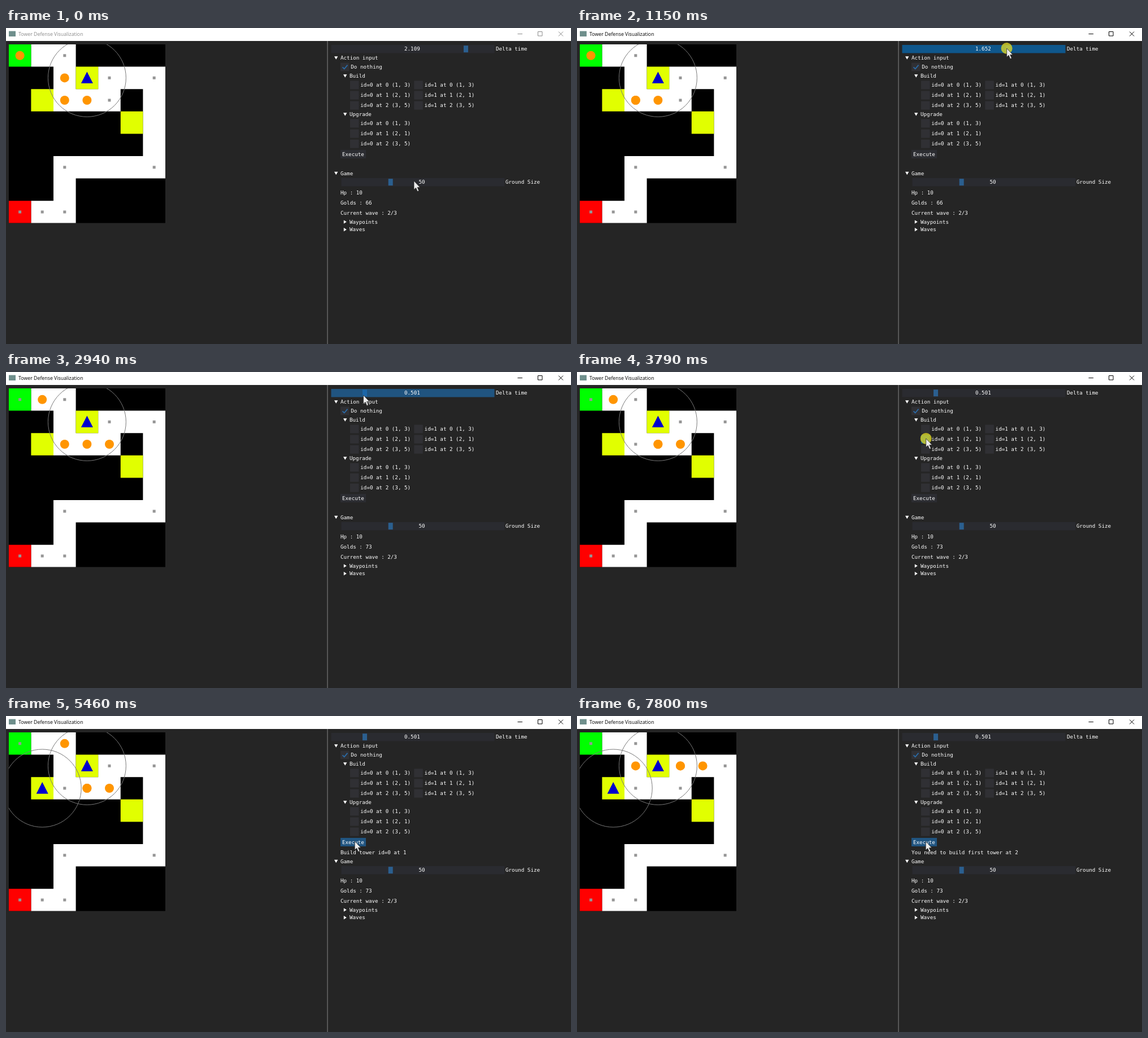
An HTML page for the animation above (8 s loop, 1000 by 560 pixels).

```html
<!DOCTYPE html>
<html lang="en">
<head>
<meta charset="utf-8">
<title>Tower Defense Visualization</title>
<style>
html, body { margin: 0; width: 100%; height: 100%; overflow: hidden; background: #252525; }
svg { display: block; width: 1000px; height: 560px; }
text { font: 9.22px "DejaVu Sans Mono", "Liberation Mono", monospace; fill: #fff; white-space: pre; }
#title { font: 8.8px "Open Sans", "Noto Sans", sans-serif; }
</style>
</head>
<body>
<svg id="stage" viewBox="0 0 1000 560"></svg>
<script>
const LOOP = 8000, CELL = 39.6, MAP_X = 4.8, MAP_Y = 29;
const stage = document.getElementById('stage');

function set(el, attrs) {
  for (const k in attrs) el.setAttribute(k, attrs[k]);
}
function add(tag, attrs, parent = stage) {
  const el = document.createElementNS('http://www.w3.org/2000/svg', tag);
  set(el, attrs);
  return parent.appendChild(el);
}
const rect = (x, y, width, height, fill, parent) => add('rect', { x, y, width, height, fill }, parent);
const show = (el, on) => set(el, { visibility: on ? 'visible' : 'hidden' });
function label(x, y, str = '') {
  const el = add('text', { x, y: y + 2.9 });
  el.textContent = str;
  return el;
}

// Window frame
rect(0, 0, 1000, 560, '#252525');
rect(0, 0, 1000, 23, '#fff');
rect(5, 5.5, 12, 9.5, '#6f8f8c');
const title = label(22, 11.1, 'Tower Defense Visualization');
title.id = 'title';
const buttons = add('path', {
  d: 'M905.5 10.5h8.5M941.5 6.5h7.5v7.5h-7.5zM978 6.5l8 8M986 6.5l-8 8', fill: 'none'
});
rect(568.3, 23, 1.4, 537, '#6b6b6b');

// Map: the road runs through the waypoints, as [column, row]
const waypoints = [[0, 0], [2, 0], [2, 2], [4, 2], [4, 1], [6, 1], [6, 5], [2, 5], [2, 7], [1, 7], [0, 7]];
const spots = [[3, 1], [1, 2], [5, 3]];
const road = [waypoints[0]];
for (const [c, r] of waypoints.slice(1)) {
  let [x, y] = road[road.length - 1];
  while (x !== c || y !== r) {
    x += Math.sign(c - x);
    y += Math.sign(r - y);
    road.push([x, y]);
  }
}
const left = c => MAP_X + c * CELL, top_ = r => MAP_Y + r * CELL;
const midX = c => left(c + .5), midY = r => top_(r + .5);

rect(MAP_X, MAP_Y, 7 * CELL, 8 * CELL, '#000', add('clipPath', { id: 'mapClip' }));
const map = add('g', { 'clip-path': 'url(#mapClip)' });
rect(MAP_X, MAP_Y, 7 * CELL, 8 * CELL, '#000', map);
function tiles(cells, fill) {
  const d = cells.map(([c, r]) => `M${left(c)} ${top_(r)}h${CELL}v${CELL}h${-CELL}z`).join('');
  add('path', { d, fill }, map);
}
tiles(road.slice(1, -1), '#fff');
tiles(road.slice(0, 1), '#0f0');
tiles(road.slice(-1), '#f00');
tiles(spots, '#e1ff00');
for (const [c, r] of waypoints) rect(midX(c) - 2.5, midY(r) - 2.5, 5, 5, '#969696', map);

// Each walker starts on a road cell and hops one cell on at each time
const walkers = [
  { cell: 0, hops: [2010, 4360, 5620] },
  { cell: 3, hops: [600, 3350, 5620, 6540] },
  { cell: 4, hops: [2840, 5620, 6540] },
  { cell: 5, hops: [2840, 5620, 7330] }
];
for (const w of walkers) w.el = add('circle', { r: 8, fill: '#ff9500' }, map);

function tower([c, r]) {
  const g = add('g', { transform: `translate(${midX(c)} ${midY(r)})` }, map);
  add('path', { d: 'M0 -11L10.5 9.7H-10.5z', fill: '#0000cd' }, g);
  add('circle', { r: 69, fill: 'none', stroke: '#787878' }, g);
  return g;
}
tower(spots[0]);
const newTower = tower(spots[1]);

// Control panel
const BAR = '#2a2b30', GRAB = '#2b5f8f', HOVER = '#205480', ACTIVE = '#0f578c';
const widgets = {};
function widget(key, x, y, w, h, idle) {
  widgets[key] = { x, y, w, h, idle, el: rect(x, y, w, h, idle) };
}
function checkbox(key, x, y, str) {
  widget(key, x, y - 7.5, 15.5, 15, '#303034');
  widgets[key].tick = add('path', {
    d: `M${x + 3.5} ${y + .3}l3.2 3.2l5.8 -6.8`, fill: 'none', stroke: '#2a6ba8', 'stroke-width': 1.8
  });
  label(x + 18.3, y, str);
}
function node(x, y, str, open = true) {
  const d = open ? `M${x - 3} ${y - 2.8}h6.4l-3.2 5.5z` : `M${x - 2.2} ${y - 3.4}v6.4l5 -3.2z`;
  add('path', { d, fill: '#fff' });
  label(x + 8, y, str);
}
function group(key, x, y, id) {
  spots.forEach(([c, r], i) => checkbox(key + i, x, y + 18.1 * i, `id=${id} at ${i} (${r}, ${c})`));
}

widget('delta', 575.5, 30, 289, 14.5, BAR);
const grab = rect(0, 31.2, 8, 12, GRAB);
const deltaText = label(705, 37.3);
label(867, 37.3, 'Delta time');
node(584, 53, 'Action input');
checkbox('none', 592, 69, 'Do nothing');
node(600, 85, 'Build');
group('a', 609, 101, 0);
group('b', 722.3, 101, 1);
node(600, 153, 'Upgrade');
group('u', 609, 169, 0);
widget('run', 592, 216, 45, 15, '#2c2d32');
label(595, 223.7, 'Execute');
const message = label(592, 241.8);
node(584, 257.6, 'Game');
rect(593.5, 266, 289, 14.5, BAR);
rect(676.7, 267.2, 8, 12, GRAB);
label(730.5, 273.3, '50');
label(884, 273.3, 'Ground Size');
label(592, 291.8, 'Hp : 10');
const golds = label(592, 310);
label(592, 328, 'Current wave : 2/3');
node(600, 343.8, 'Waypoints', false);
node(600, 357.4, 'Waves', false);

// Pointer
const glow = add('circle', { r: 10, fill: '#e8de22', opacity: .75 });
const pointer = add('path', {
  d: 'M0 0V15.4L3.5 12.3L6.2 18.6L8.8 17.5L6.1 11.4H10.8z',
  fill: '#ececec', stroke: '#1c1c1c', 'stroke-width': .7
});

// What the pointer does: sets off, presses and releases, in ms
const GLIDE = 350;
const acts = [
  { on: 'delta', go: 50, down: 600, up: 1620 },
  { on: 'delta', go: 1620, down: 2060, up: 2840 },
  { on: 'a1', go: 3350, down: 3700, up: 3800 },
  { on: 'run', go: 3800, down: 4360, up: 4610 },
  { on: 'u2', go: 5430, down: 5830, up: 5980 },
  { on: 'run', go: 6130, down: 6840, up: 7030 }
];
const BUILT = 5120, REFUSED = 7800, PAID = 2840;

const span = (t, a, b) => Math.min(1, Math.max(0, (t - a) / (b - a)));
const ease = p => p * p * (3 - 2 * p);
const mix = (a, b, p) => a + (b - a) * p;

function draw(t) {
  const drag = span(t, 2100, 2740);
  const delta = 2.109 - .76 * span(t, 820, 1370) - .848 * drag;
  const grabX = 635 + (delta - .501) * 111.3;

  let x = 722, y = 271, chosen = 'none', press = null;
  for (const a of acts) {
    if (t < a.go) break;
    const w = widgets[a.on], slider = a.on === 'delta', p = ease(span(t, a.go, a.go + GLIDE));
    x = mix(x, slider ? grabX - 2.5 : w.x + w.w * .56, p);
    y = mix(y, w.y + w.h / 2 - 1.2 + (slider ? 5 * drag : 0), p);
    if (t >= a.down && t < a.up) press = a.on;
    if (t >= a.up) chosen = w.tick ? a.on : 'none';
  }

  for (const w of walkers) {
    const [c, r] = road[w.cell + w.hops.filter(h => h <= t).length];
    set(w.el, { cx: midX(c), cy: midY(r) });
  }
  show(newTower, t >= BUILT);

  for (const key in widgets) {
    const w = widgets[key];
    const inside = x >= w.x && x < w.x + w.w && y >= w.y && y < w.y + w.h;
    const fill = press === key ? ACTIVE : inside && !press ? HOVER : w.idle;
    set(w.el, { fill });
    if (w.tick) show(w.tick, key === chosen);
    if (key === 'delta') set(grab, { x: grabX - 4, fill: fill === BAR ? GRAB : '#1c66a8' });
  }
  deltaText.textContent = delta.toFixed(3);
  golds.textContent = 'Golds : ' + (t < PAID ? 66 : 73);
  message.textContent = t < BUILT ? '' : t < REFUSED ? 'Build tower id=0 at 1' : 'You need to build first tower at 2';

  // The window gains focus with the first press
  const ink = t < acts[0].down ? '#8a8a8a' : '#000';
  title.style.fill = ink;
  set(buttons, { stroke: ink });
  set(glow, { cx: x, cy: y });
  show(glow, press);
  set(pointer, { transform: `translate(${x} ${y})` });
}

const start = performance.now();
function frame() {
  draw((performance.now() - start) % LOOP);
  requestAnimationFrame(frame);
}
frame();
</script>
</body>
</html>
```
